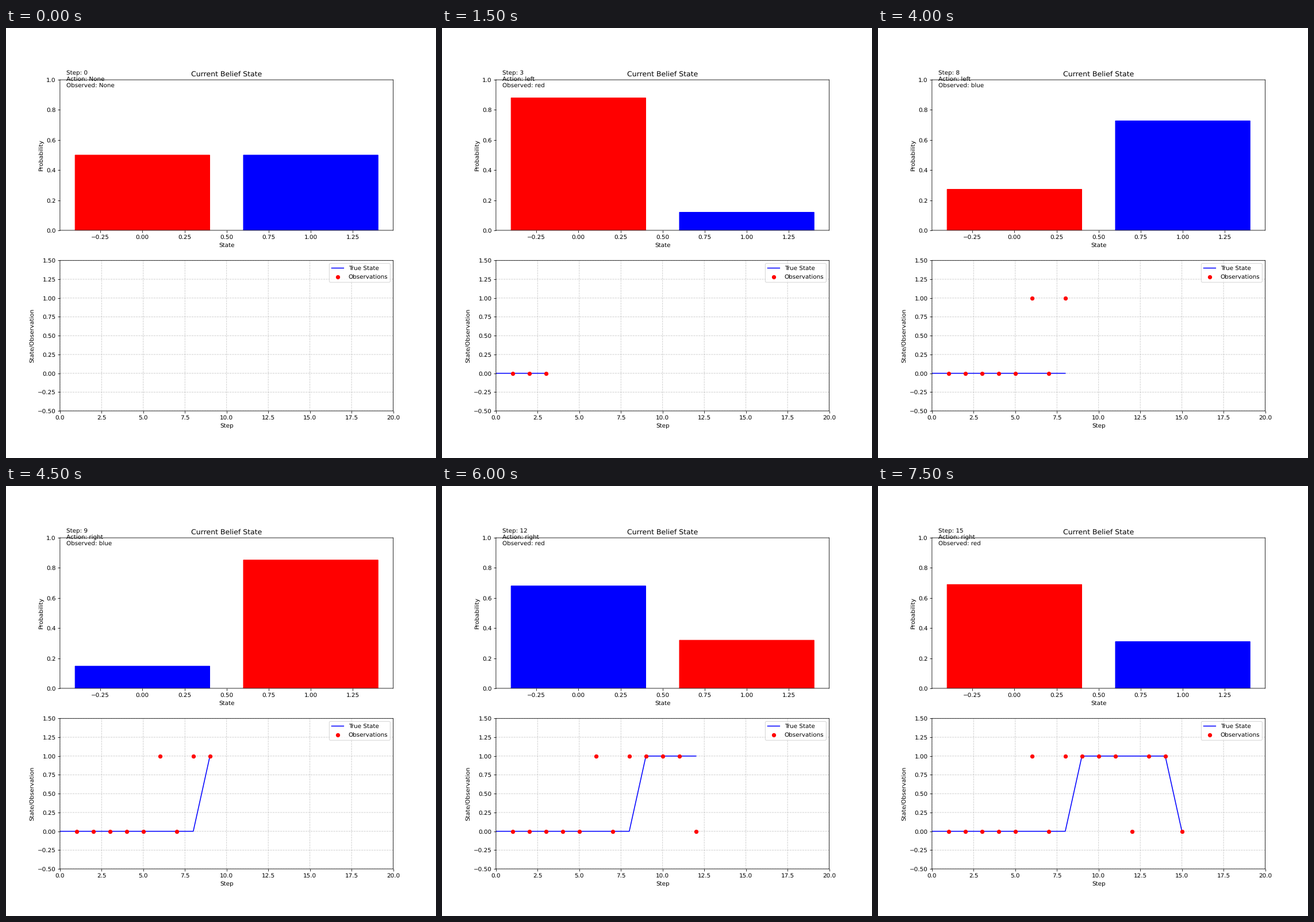
Recreate the animation shown at these times as a matplotlib script. Size 748x748 px, loop 8000 ms.

```python
import matplotlib.pyplot as plt
import numpy as np
from matplotlib.animation import FuncAnimation

INCHES, DPI = 10, 74.8
STEPS = 16
P_STAY, P_HIT = 0.7, 0.8

true_state = [0] * 9 + [1] * 6 + [0]
observed = [None, 0, 0, 0, 0, 0, 1, 0, 1, 1, 1, 1, 0, 1, 1, 0]
NAMES = ["red", "blue"]


def update_belief(belief, obs):
    """Predict with the transition model, then weigh by the observation."""
    prior = P_STAY * belief + (1 - P_STAY) * belief[::-1]
    likelihood = np.full(2, 1 - P_HIT)
    likelihood[obs] = P_HIT
    post = prior * likelihood
    return post / post.sum()


beliefs = [np.array([0.5, 0.5])]
actions = ["None"]
for obs in observed[1:]:
    actions.append("left" if beliefs[-1][0] > 0.5 else "right")
    beliefs.append(update_belief(beliefs[-1], obs))

# Soft, unsnapped edges and unhinted text
plt.rcParams.update({
    "font.family": "DejaVu Sans",
    "path.snap": False,
    "text.hinting": "none",
})
fig, (ax_bar, ax_path) = plt.subplots(
    2, 1, figsize=(INCHES, INCHES), dpi=DPI)
fig.subplots_adjust(left=0.1255, right=0.9005, bottom=0.1095, top=0.8795)

bars = ax_bar.bar([0, 1], beliefs[0], color=NAMES)
ax_bar.set_ylim(0, 1)
ax_bar.set_title("Current Belief State")
ax_bar.set_xlabel("State")
ax_bar.set_ylabel("Probability")
info = ax_bar.text(0.02, 0.95, "", transform=ax_bar.transAxes)

line, = ax_path.plot([], [], "b-", label="True State")
dots = ax_path.scatter([], [], color="red", label="Observations", zorder=3)
ax_path.set_xlim(0, 20)
ax_path.set_ylim(-0.5, 1.5)
ax_path.set_xlabel("Step")
ax_path.set_ylabel("State/Observation")
ax_path.grid(True, linestyle="--", alpha=0.7)
ax_path.legend(loc="upper right")


def draw(step):
    for i, bar in enumerate(bars):
        bar.set_height(beliefs[step][i])
        bar.set_color("red" if i == true_state[step] else "blue")
    line.set_data(range(step + 1), true_state[:step + 1])
    points = [(k, observed[k]) for k in range(1, step + 1)]
    dots.set_offsets(np.array(points, dtype=float).reshape(-1, 2))
    seen = NAMES[observed[step]] if step else "None"
    info.set_text(f"Step: {step}\nAction: {actions[step]}\nObserved: {seen}")
    return [*bars, line, dots, info]


anim = FuncAnimation(fig, draw, frames=STEPS, interval=500,
                     repeat=True, repeat_delay=0, blit=False)
plt.show()
```
